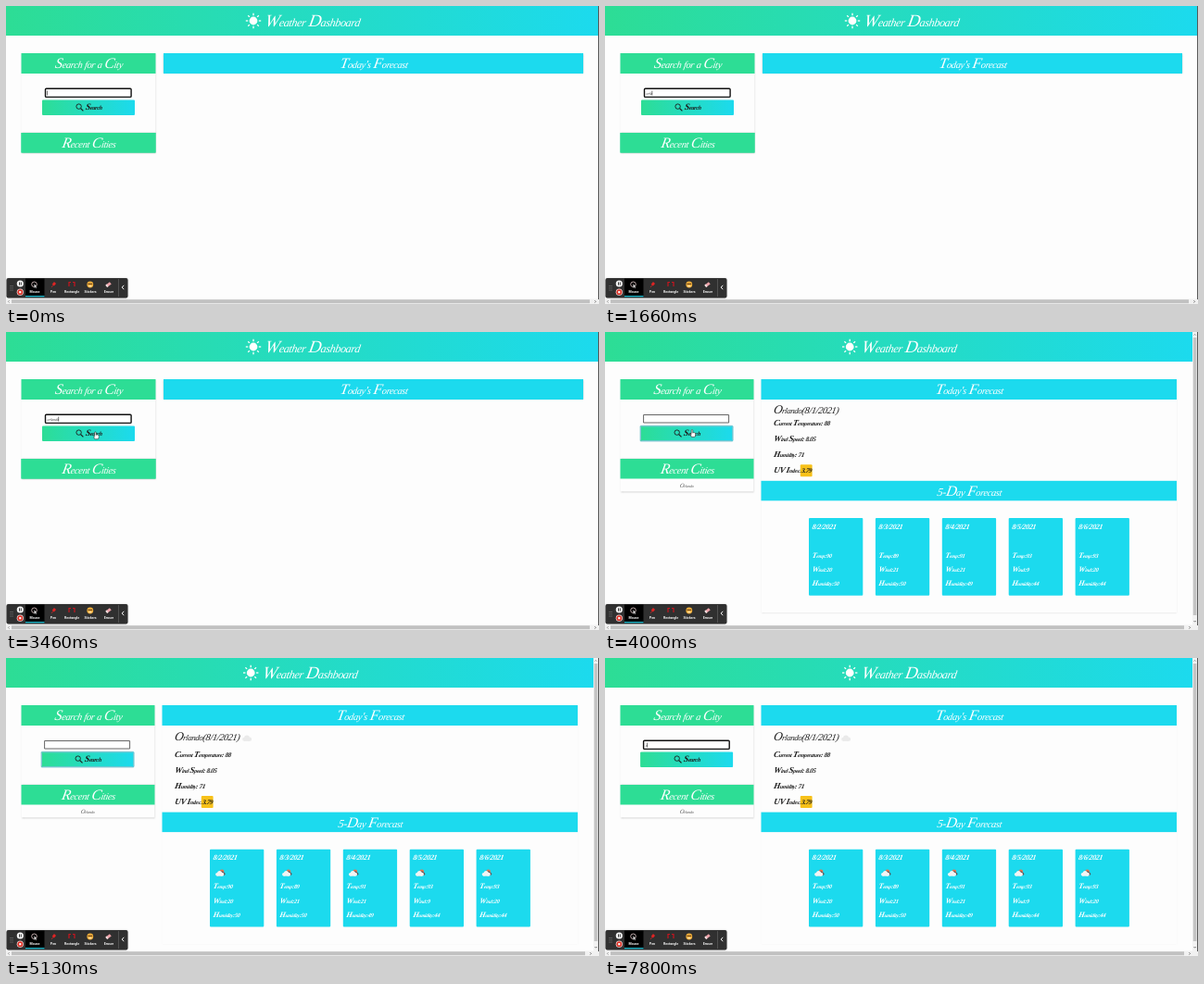
An HTML page with a canvas for the animation above (8 s loop, 640 by 322 pixels).

```html
<!DOCTYPE html>
<html lang="en">
<head>
<meta charset="utf-8">
<title>Weather Dashboard</title>
<style>
html, body { margin: 0; width: 100%; height: 100%; overflow: hidden; background: #fdfdfd; }
canvas { display: block; width: 640px; height: 322px; }
</style>
</head>
<body>
<canvas id="stage"></canvas>
<script>
const W = 640, H = 322, LOOP = 8000;
const GREEN = '#2ddd95', CYAN = '#1cdaee', INK = '#1c1c1c';
const SCRIPT = '"Liberation Serif", "Noto Serif", serif';
const CITY = 'orlando';
const FIRST_KEY = 1000, KEY_GAP = 200;
const CLICK = 3800, RESULTS = 4000, ICONS = 4200, REFOCUS = 6600, RETYPE = 7800;
// day, temperature, wind, humidity
const DAYS = [[2, 90, 20, 50], [3, 89, 21, 50], [4, 91, 21, 49], [5, 93, 9, 44], [6, 93, 20, 44]];

const canvas = document.getElementById('stage');
const ctx = canvas.getContext('2d');
const dpr = window.devicePixelRatio || 1;
canvas.width = W * dpr;
canvas.height = H * dpr;
ctx.scale(dpr, dpr);

function box(x, y, w, h, fill) {
  ctx.fillStyle = fill;
  ctx.fillRect(x, y, w, h);
}

function round(x, y, w, h, r, fill, stroke, lw = 1) {
  ctx.beginPath();
  ctx.roundRect(x, y, w, h, r);
  if (fill) { ctx.fillStyle = fill; ctx.fill(); }
  if (stroke) { ctx.strokeStyle = stroke; ctx.lineWidth = lw; ctx.stroke(); }
}

function disc(x, y, r, fill) {
  ctx.fillStyle = fill;
  ctx.beginPath();
  ctx.arc(x, y, r, 0, 7);
  ctx.fill();
}

function line(points, color, lw) {
  ctx.strokeStyle = color;
  ctx.lineWidth = lw;
  ctx.beginPath();
  points.forEach(([x, y]) => ctx.lineTo(x, y));
  ctx.stroke();
}

// Handwriting look: tall capitals, small lowercase, extra slant.
// Text is placed by its vertical middle; returns the width.
function script(s, x, y, size, color, { bold = false, align = 'left', gap = -0.03 } = {}) {
  const setFont = run => {
    const k = /[A-Z]/.test(run) ? 1.3 : /[a-z]/.test(run) ? 0.85 : 1;
    ctx.font = `italic ${bold ? 'bold ' : ''}${size * k}px ${SCRIPT}`;
  };
  ctx.save();
  ctx.textAlign = 'left';
  ctx.fillStyle = color;
  ctx.letterSpacing = gap * size + 'px';
  const runs = (s.match(/[A-Z]+|[a-z]+|[^A-Za-z]+/g) || []).map(run => {
    setFont(run);
    return [run, ctx.measureText(run).width];
  });
  const width = runs.reduce((sum, [, w]) => sum + w, 0);
  ctx.translate(align === 'center' ? x - width / 2 : x, y + size * 0.32);
  ctx.transform(1, 0, -0.18, 1, 0, 0);
  let pen = 0;
  for (const [run, w] of runs) {
    setFont(run);
    ctx.fillText(run, pen, 0);
    pen += w;
  }
  ctx.restore();
  return width;
}

function blend(x, w) {
  const g = ctx.createLinearGradient(x, 0, x + w, 0);
  g.addColorStop(0, GREEN);
  g.addColorStop(1, CYAN);
  return g;
}

function shadowed(draw) {
  ctx.save();
  ctx.shadowColor = 'rgba(0,0,0,.26)';
  ctx.shadowBlur = 1.6 * dpr;
  draw();
  ctx.restore();
}

function heading(s, x, y, w, h, color) {
  box(x, y, w, h, color);
  script(s, x + w / 2, y + 12, 12.3, '#fff', { align: 'center' });
}

function sun(x, y) {
  disc(x, y, 4.4, '#fff');
  for (let i = 0; i < 8; i++) {
    const a = i * Math.PI / 4, c = Math.cos(a), s = Math.sin(a);
    line([[x + c * 5.8, y + s * 5.8], [x + c * 8.2, y + s * 8.2]], '#fff', 1.3);
  }
}

function cloud(x, y, color, k = 1) {
  disc(x - 2.8 * k, y + 0.8 * k, 1.9 * k, color);
  disc(x, y - 0.6 * k, 2.7 * k, color);
  disc(x + 2.8 * k, y + 0.6 * k, 2.1 * k, color);
  box(x - 2.8 * k, y + 0.4 * k, 5.6 * k, 2.3 * k, color);
}

function dayIcon(x, y) {
  disc(x + 2, y - 1.4, 2.4, '#e8734e');
  cloud(x + 1.6, y + 0.6, '#57585c', 0.8);
  cloud(x - 0.4, y + 0.9, '#f4f4f4', 0.95);
}

function header(width, shift) {
  box(0, 0, width, 32, blend(0, width));
  sun(267 - shift, 16);
  script('Weather Dashboard', 279 - shift, 17.3, 14.4, '#fff');
}

function searchPanel(t, ready, shift) {
  const w = ready ? 144 : 145;
  shadowed(() => box(16.5, 51.5, w, 86, '#fdfdfd'));
  heading('Search for a City', 16.5, 51, w, 22, GREEN);
  shadowed(() => box(16.5, 137, w, ready ? 35.5 : 21.5, ready ? '#fdfdfd' : GREEN));
  heading('Recent Cities', 16.5, 137, w, 21.5, GREEN);
  if (ready) script('Orlando', 88, 166, 5, '#555', { align: 'center' });

  const focused = t < CLICK || t >= REFOCUS;
  input(t, 42.5 - shift, focused);
  button(39 - shift, !focused);
}

function input(t, x, focused) {
  if (focused) round(x, 89.2, 92.6, 9.2, 1, '#fff', '#111', 1.4);
  else round(x, 89.5, 92, 8.5, 0, '#fff', '#666', 1);
  const again = t >= REFOCUS;
  const first = again ? RETYPE : FIRST_KEY;
  let count = 0;
  if (t >= first && (again || t < RESULTS)) {
    count = Math.min(CITY.length, Math.floor((t - first) / KEY_GAP) + 1);
  }
  const width = script(CITY.slice(0, count), x + 1.8, 94, 5, '#444');
  const last = count ? first + (count - 1) * KEY_GAP : again ? REFOCUS : 0;
  if (focused && (t - last) % 1000 < 500) box(x + 1.6 + width, 91.5, 0.6, 5, '#222');
}

function button(x, focused) {
  if (focused) round(x - 0.6, 100.8, 101, 17.8, 1.5, '#9fd3dc');
  round(x, 101.4, 100, 16.6, 1, blend(x, 100));
  if (focused) round(x + 0.4, 101.8, 99.2, 15.8, 1, null, '#79c5d1', 1);
  ctx.strokeStyle = INK;
  ctx.lineWidth = 0.9;
  ctx.beginPath();
  ctx.arc(x + 39.6, 108.6, 2.7, 0, 7);
  ctx.stroke();
  line([[x + 41.6, 110.6], [x + 44.4, 113.4]], INK, 1.2);
  script('Search', x + 46.5, 110, 7.5, INK, { bold: true, gap: -0.05 });
}

function emptyForecast() {
  shadowed(() => box(170, 51.5, 453, 21.5, CYAN));
  heading("Today's Forecast", 170, 51, 453, 22, CYAN);
}

function forecast(loaded) {
  const drop = loaded ? 5.8 : 0;
  const x = 168.5, w = 448.5;
  shadowed(() => box(x, 51.5, w, 252 + drop, '#fdfdfd'));
  heading("Today's Forecast", x, 51, w, 22, CYAN);
  script('Orlando(8/1/2021)', 181.5, loaded ? 85.5 : 84.3, 10.2, INK);
  if (loaded) cloud(260, 87, '#eaeaea', 1.05);

  const row = (s, y) => script(s, 181.8, y + drop, 7.1, INK, { bold: true, gap: -0.05 });
  row('Current Temperature: 88', 98.5);
  row('Wind Speed: 8.05', 115.5);
  row('Humidity: 71', 132.8);
  row('UV Index:', 150);
  round(210.8, 143.3 + drop, 12.8, 13, 1, '#f7c11a');
  script('3.79', 211.8, 150 + drop, 7.1, INK, { bold: true, gap: -0.05 });

  heading('5-Day Forecast', x, 160.8 + drop, w, 21.5, CYAN);
  DAYS.forEach((day, i) => dayCard(220 + i * 71.9, 201 + drop, day, loaded));
}

function dayCard(x, y, [day, temp, wind, humid], loaded) {
  round(x, y, 58.3, 83.8, 1, CYAN);
  const put = (s, dy, size = 6.4) =>
    script(s, x + 3.2, y + dy, size, '#fff', { bold: true, gap: -0.04 });
  put(`8/${day}/2021`, 9, 8);
  if (loaded) dayIcon(x + 11, y + 25.4);
  put('Temp:' + temp, 40.6);
  put('Wind:' + wind, 56);
  put('Humidity:' + humid, 71.3);
}

function scrollbars(ready) {
  const right = ready ? 634 : 639;
  box(0, 316.5, W, 5.5, '#f1f1f1');
  round(6, 317.3, right - 15, 4, 0, '#c1c1c1');
  line([[3.6, 318.2], [2.4, 319.4], [3.6, 320.6]], '#777', 0.7);
  line([[right - 3.6, 318.2], [right - 2.4, 319.4], [right - 3.6, 320.6]], '#444', 0.7);
  if (ready) {
    box(634, 0, 5, 317, '#f3f3f3');
    box(634.8, 6, 3.6, 300, '#c4c4c4');
    line([[635.5, 3.6], [636.6, 2.4], [637.7, 3.6]], '#777', 0.7);
    line([[635.5, 312], [636.6, 313.2], [637.7, 312]], '#444', 0.7);
  }
  box(639.2, 0, 0.8, 317, '#333');
}

function toolbar() {
  shadowed(() => round(0.5, 294, 131, 21.6, 2, '#303030'));
  for (let i = 0; i < 6; i++) disc(5 + (i % 2) * 2, 302.5 + (i >> 1) * 2.2, 0.5, '#999');
  disc(15.3, 300, 3.6, '#f4f4f4');
  box(14, 298.4, 0.9, 3.2, '#222');
  box(15.8, 298.4, 0.9, 3.2, '#222');
  disc(15.3, 309.2, 3.6, '#f1dada');
  disc(15.3, 309.2, 2.9, '#d93025');
  box(14.2, 308.1, 2.2, 2.2, '#fff');
  box(21, 294.5, 20.5, 20, '#000');
  box(21, 313, 20.5, 1.4, '#1fb4c6');

  ctx.font = 'bold 3.6px Roboto, sans-serif';
  ctx.textAlign = 'center';
  ctx.fillStyle = '#f5f5f5';
  ['Mouse', 'Pen', 'Rectangle', 'Stickers', 'Eraser'].forEach((s, i) => ctx.fillText(s, 31 + i * 20, 310.2));

  ctx.strokeStyle = '#e9cfcf';
  ctx.lineWidth = 0.8;
  ctx.beginPath();
  ctx.arc(30.5, 300.8, 2.8, 0, 7);
  ctx.stroke();
  pointer(30.5, 300.5, 0.65);
  line([[49, 304], [51.3, 301.2]], '#c62828', 0.8);
  line([[50.8, 301.6], [53, 299]], '#e02424', 2.8);
  for (const side of [-1, 1]) {
    line([[71 + side, 298.5], [71 + side * 3, 298.5], [71 + side * 3, 303]], '#c9141e', 1.2);
  }
  disc(90.8, 301, 3.4, '#f3b13c');
  box(88.4, 299.7, 4.8, 1.2, '#704618');
  box(89.3, 302.4, 3, 0.8, '#fff');
  line([[108.8, 302.4], [112.8, 299.4]], '#eea3aa', 3);
  line([[108.2, 302.9], [109.6, 301.8]], '#f7e4e4', 3);
  box(121, 295, 0.6, 19, '#666');
  line([[127.3, 301.8], [125.2, 304], [127.3, 306.2]], '#fff', 1);
}

function pointer(x, y, k = 1) {
  const pts = [[0, 0], [0, 6], [1.4, 4.8], [2.5, 7], [3.4, 6.5], [2.4, 4.4], [4.2, 4.3]];
  ctx.beginPath();
  pts.forEach(([px, py]) => ctx.lineTo(x + px * k, y + py * k));
  ctx.closePath();
  ctx.fillStyle = '#fff';
  ctx.fill();
  ctx.strokeStyle = '#777';
  ctx.lineWidth = 0.5;
  ctx.stroke();
}

function hand(x, y) {
  round(x - 1.4, y - 0.2, 5, 4.6, 1.4, '#fff', '#222', 0.6);
  round(x - 0.8, y - 3.4, 1.6, 5.2, 0.8, '#fff', '#222', 0.6);
  box(x - 0.5, y + 0.4, 3.6, 2, '#fff');
}

function beam(x, y) {
  line([[x, y - 3], [x, y + 3]], '#222', 0.6);
  line([[x - 1, y - 3], [x + 1, y - 3]], '#222', 0.5);
  line([[x - 1, y + 3], [x + 1, y + 3]], '#222', 0.5);
}

// time, x, y
const INWARD = [[3000, 112, 126], [3600, 94, 109], [4200, 94, 109], [4600, 99, 119]];
const BACK = [[6000, 94, 109], [6330, 99, 119], [6400, 99, 119], [6600, 90, 94], [RETYPE, 90, 94]];

function cursor(t) {
  const path = t < 5000 ? INWARD : BACK;
  const i = path.findIndex(p => p[0] > t);
  if (i < 1) return;
  const [t0, x0, y0] = path[i - 1], [t1, x1, y1] = path[i];
  const u = (t - t0) / (t1 - t0), e = u * u * (3 - 2 * u);
  const x = x0 + (x1 - x0) * e, y = y0 + (y1 - y0) * e;
  if (y > 118) pointer(x, y, 0.8);
  else if (y > 101) hand(x, y);
  else beam(x, y);
}

function draw(t) {
  const ready = t >= RESULTS;
  box(0, 0, W, H, '#fdfdfd');
  header(ready ? 634 : 639.2, ready ? 2.8 : 0);
  searchPanel(t, ready, ready ? 0.9 : 0);
  if (ready) forecast(t >= ICONS);
  else emptyForecast();
  scrollbars(ready);
  toolbar();
  cursor(t);
}

const start = performance.now();
function tick() {
  draw((performance.now() - start) % LOOP);
  requestAnimationFrame(tick);
}
tick();
</script>
</body>
</html>
```
